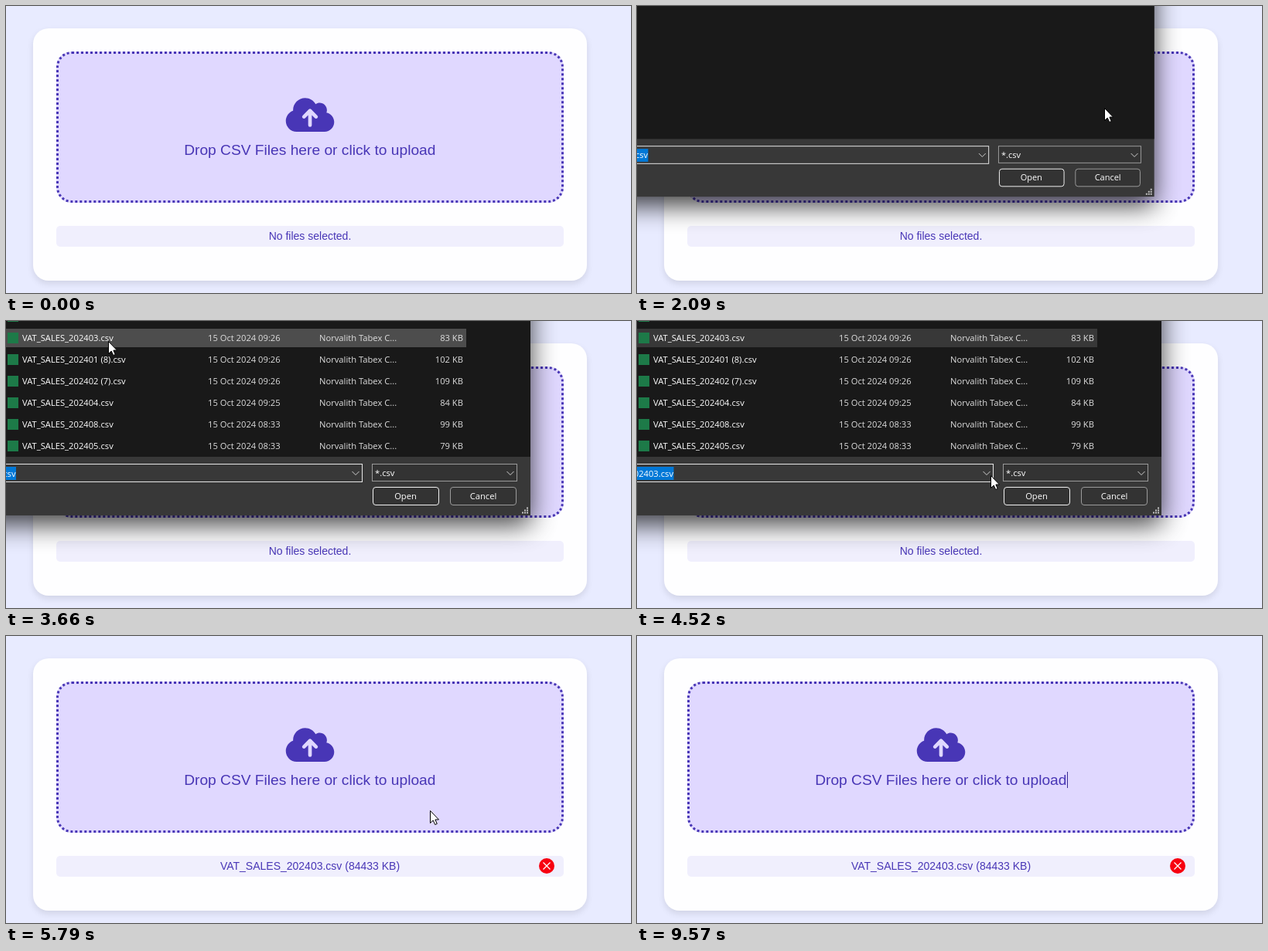
Recreate the animation shown at these times as an HTML page. Size 808x372 px, loop 9770 ms.

```html
<!DOCTYPE html>
<html lang="en">
<head>
<meta charset="utf-8">
<title>CSV upload</title>
<style>
  html, body { margin: 0; width: 100%; height: 100%; overflow: hidden; background: #e8ebff; }
  body { position: relative; font-family: "Liberation Sans", Arial, sans-serif; }
  div, svg { position: absolute; box-sizing: border-box; }
  .card { left: 35px; top: 29px; width: 716px; height: 327px; border-radius: 20px; background: #fefeff; box-shadow: 0 4px 8px rgba(0, 0, 0, .1); }
  .zone { left: 65px; top: 59px; width: 656px; height: 196px; border: 3px dotted #4836b6; border-radius: 20px; background: #e0d8ff; }
  .bar { left: 65px; top: 285px; width: 656px; height: 27px; border-radius: 5px; background: #f0effd; }
  svg { left: 0; top: 0; }
  .label { fill: #4836b6; text-anchor: middle; }
  #dialog { font: 11.2px "Open Sans", "Noto Sans", sans-serif; fill: #fff; }
</style>
</head>
<body>
<div class="card"></div>
<div class="zone"></div>
<div class="bar"></div>
<svg width="808" height="372" viewBox="0 0 808 372">
  <defs>
    <filter id="blur" x="-20%" y="-20%" width="140%" height="140%"><feGaussianBlur stdDeviation="17"/></filter>
  </defs>

  <g transform="translate(361.75 116.2) scale(.0977)">
    <path fill="#4836b6" d="M144 480C64.5 480 0 415.5 0 336c0-62.8 40.2-116.2 96.2-135.9-.1-2.7-.2-5.4-.2-8.1 0-88.4 71.6-160 160-160 59.3 0 111 32.2 138.7 80.2C409.9 102 428.3 96 448 96c53 0 96 43 96 96 0 12.2-2.3 23.8-6.4 34.6C596 238.4 640 290.1 640 352c0 70.7-57.3 128-128 128z"/>
    <path fill="none" stroke="#e0d8ff" stroke-width="48" stroke-linecap="round" stroke-linejoin="round" d="M240 280 320 200 400 280M320 200V392"/>
  </g>
  <text class="label" x="392.8" y="193" font-size="19.2">Drop CSV Files here or click to upload</text>
  <rect id="caret" x="556" y="176" width="1" height="21" fill="#3a2c92"/>
  <text class="label" id="status" x="393" y="303" font-size="14"></text>
  <g id="remove">
    <circle cx="699" cy="298" r="10" fill="#f70010"/>
    <path d="M694.5 293.5l9 9m0-9l-9 9" stroke="#fff" stroke-width="1.3"/>
  </g>

  <g id="dialog">
    <rect x="-300" y="-300" width="978" height="564" opacity=".75" fill="#000" filter="url(#blur)"/>
    <rect x="-300" y="-300" width="978" height="552" fill="#383838"/>
    <rect x="-300" y="-300" width="978" height="476" fill="#191919"/>
    <g id="files"></g>
    <rect x="-100.5" y="185.5" width="561" height="23" fill="#383838" stroke="#e6e6e6"/>
    <rect id="selection" x="-90" y="189" height="17" fill="#0078d7"/>
    <text id="fileName" y="201.5" text-anchor="end"></text>
    <rect x="473.5" y="185.5" width="187" height="22" fill="#333" stroke="#9b9b9b"/>
    <text x="477" y="201">*.csv</text>
    <path d="M447.5 195l4.5 4.5 4.5-4.5M647.5 195l4.5 4.5 4.5-4.5" fill="none" stroke="#d0d0d0"/>
    <rect id="open" x="474.5" y="215.5" width="85" height="23" rx="3.5"/>
    <rect x="574.5" y="215.5" width="85" height="23" rx="3.5" fill="#333" stroke="#9b9b9b"/>
    <g text-anchor="middle">
      <text x="516.5" y="231">Open</text>
      <text x="617" y="231">Cancel</text>
    </g>
    <path d="M667 248.5h8M670 245.5h5M673 242.5h2" stroke="#c4c4c4" stroke-width="2" stroke-dasharray="2 1"/>
  </g>

  <g id="cursor">
    <path id="arrow" fill="#fff" stroke="#000" stroke-linejoin="round" d="M.5.5V16.5L4.2 13 6.7 18.5 9.3 17.4 6.9 12H11.5Z"/>
    <path id="hand" fill="#fff" stroke="#000" stroke-linejoin="round" d="M-1.5 13V2Q0-.8 1.5 2V7.500Q3.500 6 4.500 8 6.500 7 7.500 9 10 8 10.500 10.500V15Q10 18 8.500 21.500H0Q-2-2 -2 18L-6 12.500Q-6.500 10-4 10.500Z"/>
    <circle id="ring" r="9.5" fill="none" stroke="#2a8fe0" stroke-width="4"/>
  </g>
</svg>
<script>
const LOOP = 9770;
const CHOSEN = 'VAT_SALES_202403.csv';
const $ = id => document.getElementById(id);
const set = (id, attrs) => Object.entries(attrs).forEach(([k, v]) => $(id).setAttribute(k, v));
const show = (id, on) => set(id, { visibility: on ? 'visible' : 'hidden' });
const within = (v, a, b) => v >= a && v < b;
const progress = (t, from, to) => Math.min(1, Math.max(0, (t - from) / (to - from)));
const easeOut = k => 1 - (1 - k) ** 2;
const easeInOut = k => k * k * (3 - 2 * k);

const FILES = [
  'VAT_SALES_202406 (2).csv|09:27|91',
  CHOSEN + '|09:26|83',
  'VAT_SALES_202401 (8).csv|09:26|102',
  'VAT_SALES_202402 (7).csv|09:26|109',
  'VAT_SALES_202404.csv|09:25|84',
  'VAT_SALES_202408.csv|08:33|99',
  'VAT_SALES_202405.csv|08:33|79'
];

$('files').innerHTML = '<rect id="row" y="10" x="-300" width="895" height="24"/>' +
  FILES.map((line, i) => {
    const [name, time, size] = line.split('|');
    const y = i * 28 - 2;
    return `<rect x="2" y="${y - 11}" width="14" height="14" fill="#1d7a48"/>
      <text x="21" y="${y}">${name}</text>
      <g fill="#dedede"><text x="261" y="${y}">15 Oct 2024 ${time}</text>
      <text x="405" y="${y}">Norvalith Tabex C...</text>
      <text x="591" y="${y}" text-anchor="end">${size} KB</text></g>`;
  }).join('');

// Each move eases to a point; bend bows the path sideways.
const ENTRY = { x: 761, y: 330 };
const MOVES = [
  { from: 320, to: 1150, x: 604, y: 132, bend: 0 },
  { from: 2300, to: 2980, x: 14, y: 183, bend: 0 },
  { from: 3050, to: 3660, x: 132, y: 26, bend: -.1 },
  { from: 3860, to: 4790, x: 548, y: 226, bend: -.06 },
  { from: 7930, to: 8900, x: 527, y: 333, bend: .5 },
  { from: 8960, to: 9240, x: 560, y: 346, bend: 0 }
];

function pointerAt(t) {
  return MOVES.reduce((p, move) => {
    const k = easeInOut(progress(t, move.from, move.to));
    const bow = move.bend * Math.sin(Math.PI * k);
    const dx = move.x - p.x, dy = move.y - p.y;
    return { x: p.x + dx * k + dy * bow, y: p.y + dy * k - dx * bow };
  }, ENTRY);
}

function drawDialog(t) {
  const entered = easeOut(progress(t, 2000, 2250));
  const closing = progress(t, 5040, 5250);
  const scale = .96 + .04 * entered - .024 * closing;
  set('dialog', {
    display: within(t, 2030, 5250) ? 'inline' : 'none',
    opacity: Math.min(1, entered * 1.7) * (1 - closing ** 1.7),
    transform: `translate(100 -50) scale(${scale}) translate(-100 50)`
  });

  const chosen = t >= 3860;
  const textEnd = chosen ? 47.5 : 13;
  set('files', { display: t >= 2230 ? 'inline' : 'none' });
  set('row', { fill: chosen ? '#383838' : t >= 2500 ? '#4d4d4d' : 'none' });
  set('selection', { width: textEnd + 90 });
  set('fileName', { x: textEnd - .5 });
  $('fileName').textContent = chosen ? CHOSEN : '*.csv';

  const hovered = t >= 4730;
  set('open', { fill: hovered ? '#666' : '#333', stroke: hovered ? '#9b9b9b' : '#f2f2f2' });
}

function drawCursor(t) {
  const { x, y } = pointerAt(t);
  const overZone = within(x, 65, 721) && within(y, 59, 255);
  const waiting = within(t, 1420, 1490);
  const pointing = overZone && (t < 1420 || t > 7930);
  set('cursor', {
    transform: `translate(${Math.round(x)} ${Math.round(y)})`,
    display: within(t, 320, 9240) ? 'inline' : 'none'
  });
  show('hand', pointing);
  show('ring', waiting);
  show('arrow', !pointing && !waiting);
}

function caretOn(t) {
  return within(t, 1420, 1690) || t >= 5250 && Math.floor((t - 5250) / 533) % 2 === 0;
}

function draw(t) {
  const uploaded = t >= 5330;
  $('status').textContent = uploaded ? `${CHOSEN} (84433 KB)` : 'No files selected.';
  show('remove', uploaded);
  show('caret', caretOn(t));
  drawDialog(t);
  drawCursor(t);
}

const start = performance.now();
function tick() {
  draw((performance.now() - start) % LOOP);
  requestAnimationFrame(tick);
}
tick();
</script>
</body>
</html>
```
